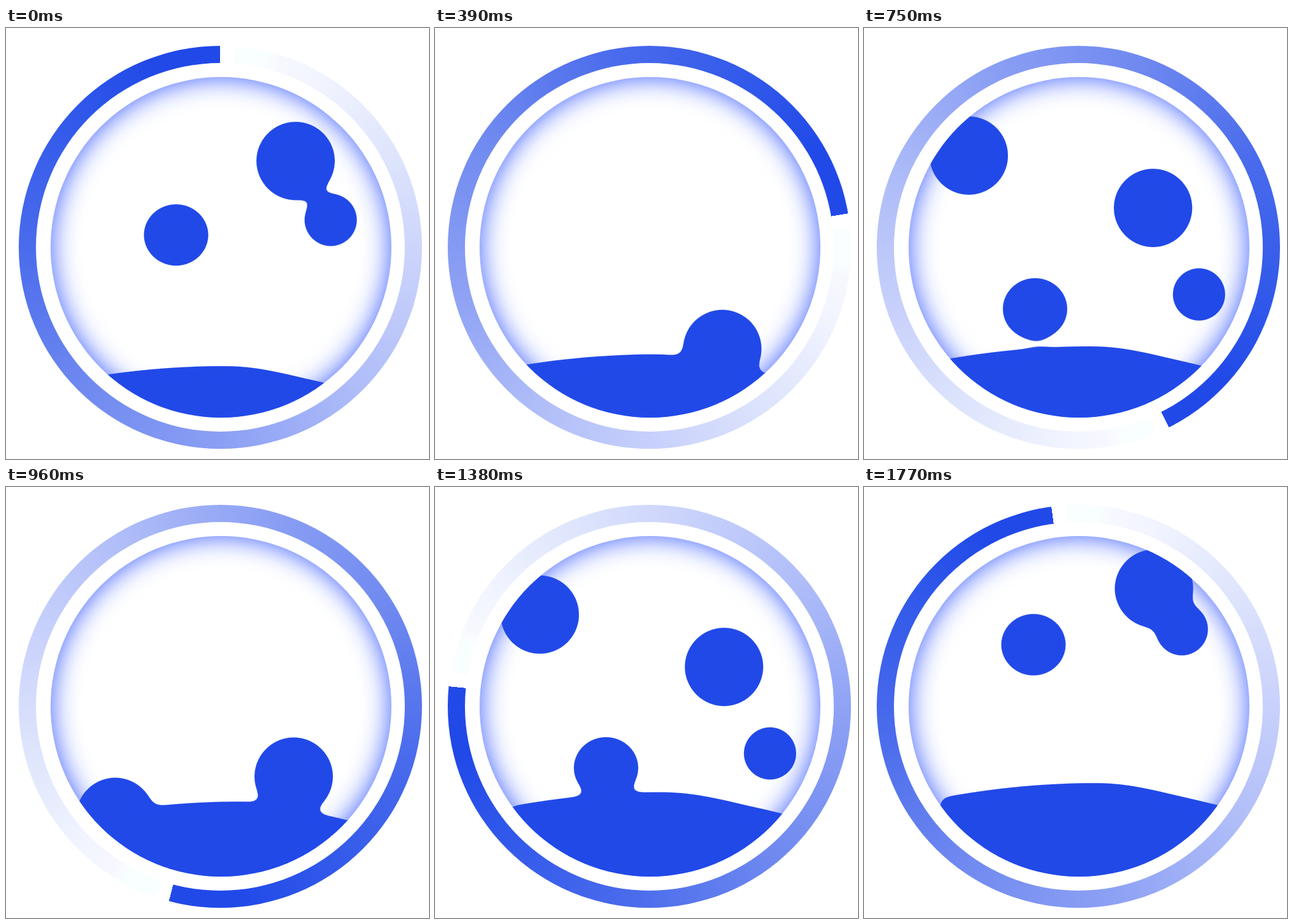
These frames come from a looping animation (664x677 px, 1.8 s). An HTML page:

```html
<!DOCTYPE html>
<html lang="en">
<head>
<meta charset="utf-8">
<title>Liquid loader</title>
<style>
  html, body { margin: 0; width: 100%; height: 100%; overflow: hidden; background: #fff; }
  div, svg { position: absolute; }
  svg { left: 0; top: 0; }
  #ring {
    left: 20px; top: 28px; width: 633px; height: 633px; border-radius: 50%;
    background: conic-gradient(from var(--turn),
      #fff 4deg, #f9feff 4.1deg 14deg, #f7f8ff 18deg, #f1f4ff 32deg, #e8edfd 45deg,
      #dce3fc 65deg, #cdd5fc 90deg, #afbdf8 135deg, #8b9ff4 180deg, #6f89f0 225deg,
      #4a6bec 270deg, #2f57ea 315deg, #2149e8 340deg);
  }
  #hole { left: 47px; top: 55px; width: 579px; height: 579px; border-radius: 50%; background: #fff; }
  #glass {
    left: 70px; top: 77px; width: 535px; height: 535px; border-radius: 50%;
    box-shadow: inset 0 0 42px #3a5cff;
  }
</style>
</head>
<body>
<div id="ring"></div>
<div id="hole"></div>
<div id="glass"></div>
<svg width="664" height="677">
  <defs>
    <clipPath id="round"><circle cx="337.5" cy="344.5" r="267.5"/></clipPath>
    <filter id="goo" filterUnits="userSpaceOnUse" x="0" y="0" width="664" height="677" color-interpolation-filters="sRGB">
      <feGaussianBlur stdDeviation="9"/>
      <feColorMatrix values="1 0 0 0 0  0 1 0 0 0  0 0 1 0 0  0 0 0 20 -9.5"/>
    </filter>
  </defs>
  <g clip-path="url(#round)">
    <g id="liquid" filter="url(#goo)" fill="#2149e8">
      <path id="wave" d="M-245 23.5Q-122 0 0 0C55 0 100 14 155 26L300 61V400H-245Z"/>
    </g>
  </g>
</svg>
<script>
  const STEP = 30, STEPS = 60, CYCLE = 20;
  const byId = id => document.getElementById(id);

  // Step numbers at which the values below are reached
  const keys   = [0, 7, 19, 32, 40, 51, 59, 60];
  const turns  = [0, 42.8, 117.8, 194.8, 236.2, 308.6, 352.3, 360];
  const falls  = [3, 10, 20, 33, 40, 51, 61, 63];
  const waveXs = [343, 346, 347, 367, 373, 345, 364, 366];
  const waveYs = [531, 520, 505, 494, 487, 473, 465, 464];

  // Drops: start position, travel per fall unit, radii
  const drops = [
    { x: 455.5, y: 135,   dx: -0.3, dy: 24.6, rx: 62.1, ry: 62.1 },
    { x: 493.5, y: 184.5, dx: 5.4,  dy: 39,   rx: 42,   ry: 42 },
    { x: 265.5, y: 209,   dx: 0.5,  dy: 38.7, rx: 51.3, ry: 48.9 },
    { x: 158.5, y: -72,   dx: 1,    dy: 45.4, rx: 62.1, ry: 62.1 }
  ];

  // Two copies of each drop: one falling now, one entering from above
  const blobs = [0, CYCLE].flatMap(lag => drops.map(drop => {
    const el = document.createElementNS("http://www.w3.org/2000/svg", "ellipse");
    el.setAttribute("rx", drop.rx);
    el.setAttribute("ry", drop.ry);
    byId("liquid").append(el);
    return { el, drop, lag };
  }));

  function at(values, step) {
    const i = keys.findLastIndex(k => k <= step);
    const part = (step - keys[i]) / (keys[i + 1] - keys[i]);
    return values[i] + (values[i + 1] - values[i]) * part;
  }

  function draw(now) {
    const step = Math.floor(now / STEP) % STEPS;
    const fall = at(falls, step) % CYCLE;
    byId("ring").style.setProperty("--turn", at(turns, step) + "deg");
    byId("wave").setAttribute("transform", `translate(${at(waveXs, step)} ${at(waveYs, step)})`);
    for (const { el, drop, lag } of blobs) {
      const u = fall - lag;
      el.setAttribute("cx", drop.x + drop.dx * u);
      el.setAttribute("cy", drop.y + drop.dy * u);
    }
  }

  const start = performance.now();
  function loop() {
    draw(performance.now() - start);
    requestAnimationFrame(loop);
  }
  loop();
</script>
</body>
</html>
```
